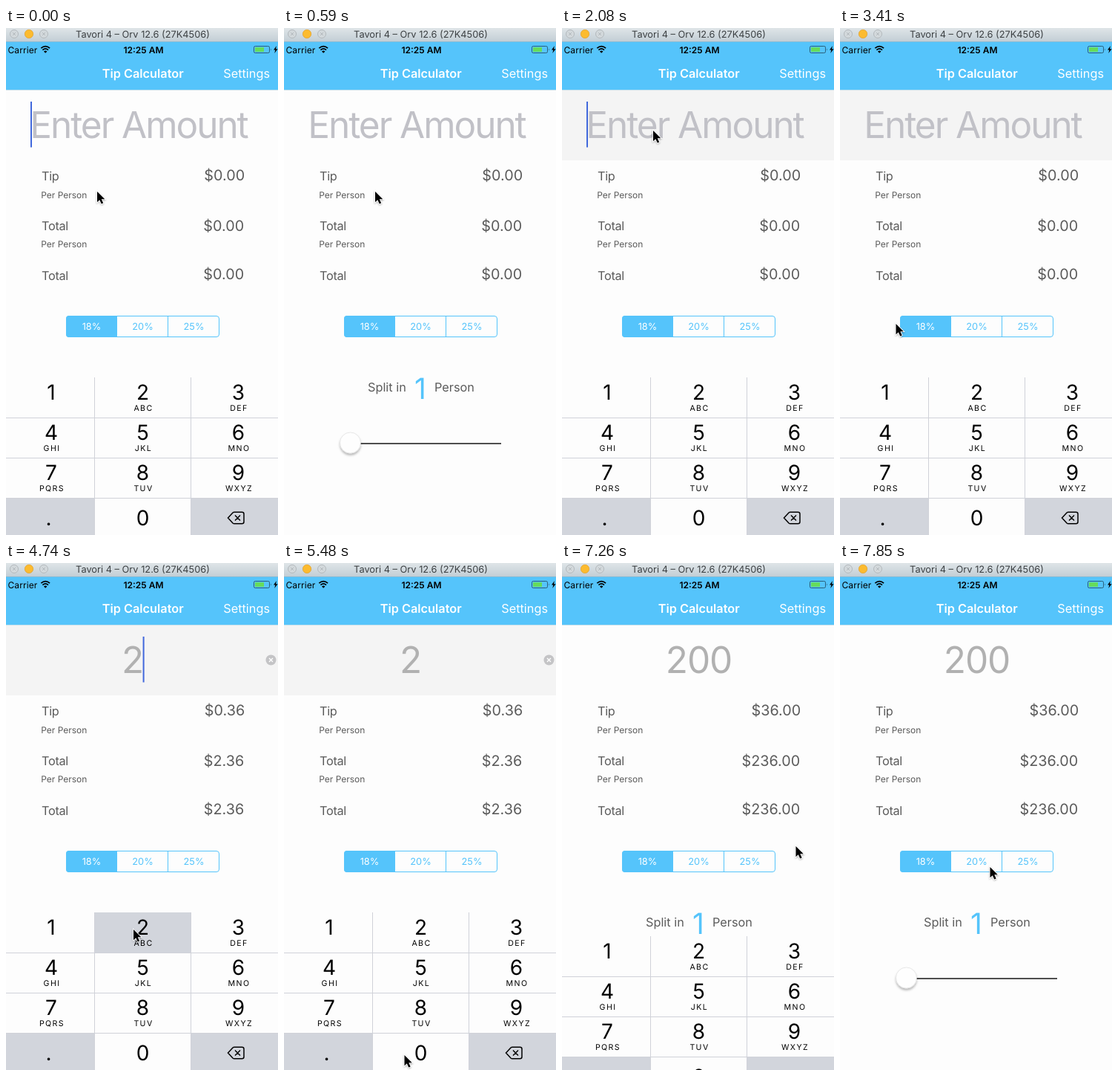
An HTML page for the animation above (8 s loop, 367 px wide and 682 px high).

```html
<!DOCTYPE html>
<html lang="en">
<head>
<meta charset="utf-8">
<title>Tip Calculator</title>
<style>
  html, body { margin: 0; width: 100%; height: 100%; overflow: hidden; background: #fdfdfd; }
  svg { display: block; width: 100vw; height: 100vh; font-family: Inter, Roboto, sans-serif; text-rendering: geometricPrecision; }
  .mid { text-anchor: middle; }
  .end { text-anchor: end; }
  .bold { font-weight: 600; }
  .gray { fill: #5b5b5b; }
  .blue { fill: #55c4fb; }
  .white { fill: #fff; }
  .t12 { font-size: 12px; }
  .t13 { font-size: 12.8px; }
  .t16 { font-size: 16.3px; }
  .money { font-size: 19.8px; }
  .amount { font-size: 49.5px; }
  .digit { font-size: 28px; }
  .letters { font-size: 10.6px; letter-spacing: 1.4px; }
</style>
</head>
<body>
<svg viewBox="0 0 367 682" preserveAspectRatio="none">
  <defs>
    <linearGradient id="bar" x2="0" y2="1">
      <stop offset="0" stop-color="#dfe5e8"/>
      <stop offset="1" stop-color="#c3ced5"/>
    </linearGradient>
    <filter id="shadow" x="-30%" y="-30%" width="160%" height="170%">
      <feDropShadow dx="0" dy="2.5" stdDeviation="1.8" flood-opacity=".28"/>
    </filter>
    <filter id="soft" x="-30%" y="-30%" width="160%" height="170%">
      <feDropShadow dx="0" dy="1" stdDeviation=".8" flood-opacity=".35"/>
    </filter>
  </defs>
  <rect width="367" height="682" fill="#fdfdfd"/>

  <!-- window bar -->
  <rect width="367" height="18" fill="url(#bar)"/>
  <g fill="#d3d9dc" stroke="#b3b9bd">
    <circle cx="11" cy="8" r="5.5"/>
    <circle cx="51" cy="8" r="5.5"/>
    <path d="M9 6l4 4m0-4l-4 4M49 6l4 4m0-4l-4 4" fill="none"/>
  </g>
  <circle cx="31" cy="8" r="5.7" fill="#fcbb2f" stroke="#e0a02c" stroke-width=".7"/>
  <text class="mid t13" x="184.5" y="13" fill="#3c4043">Tavori 4 – Orv 12.6 (27K4506)</text>

  <!-- header -->
  <rect y="18" width="367" height="65" class="blue"/>
  <rect y="18" width="367" height="1" fill="#8cbcd4"/>
  <rect y="83" width="367" height="1" fill="#c3dfec"/>
  <text class="t12" x="2.5" y="33.5" letter-spacing=".1">Carrier</text>
  <g fill="none" stroke="#000" stroke-width="1.7">
    <path d="M47.3 27.2q5.9-5.2 11.8 0M49.4 29.6q3.8-3.3 7.6 0"/>
    <path d="M51 31.4q2.2-1.8 4.4 0L53.2 33.8z" fill="#000" stroke="none"/>
  </g>
  <text class="mid bold t12" x="185.5" y="33.5">12:25 AM</text>
  <rect x="334.5" y="24.5" width="21" height="9" rx="1.8" fill="none" stroke="#2b5f78"/>
  <rect x="336" y="26" width="12" height="6" fill="#66dc5c"/>
  <path d="M357 27.5q1.5 1.5 0 3z" fill="#2b5f78"/>
  <path d="M365 24l-4 5.6h2.4l-1.2 4.4 4.4-5.8h-2.5z"/>
  <text class="mid bold t16 white" x="184.7" y="67">Tip Calculator</text>
  <text class="end t16 white" x="356" y="67">Settings</text>

  <!-- amount field -->
  <rect id="field" y="84" width="367" height="94" fill="#f4f4f4"/>
  <text id="hint" class="amount" x="32.3" y="148" letter-spacing="-2.05" fill="#c1c1c7">Enter Amount</text>
  <text id="amount" class="amount mid" y="148" letter-spacing="-1.1" fill="#b1b1b1"></text>
  <rect id="caret" y="99" width="2" height="61.5" fill="#4168dc"/>
  <g id="clear">
    <circle cx="357.5" cy="130.5" r="7" fill="#c4c4c6"/>
    <path d="M355 128l5 5m0-5l-5 5" stroke="#fff" stroke-width="1.3"/>
  </g>

  <!-- results -->
  <g class="gray">
    <g class="t16" letter-spacing="-.3">
      <text x="48" y="205">Tip</text>
      <text x="48" y="271.5">Total</text>
      <text x="48" y="338.5">Total</text>
    </g>
    <text class="t12" x="47.2" y="228.5">Per Person</text>
    <text class="t12" x="47.2" y="294.5">Per Person</text>
    <text id="tip" class="money end" x="322.2" y="205.3"></text>
    <text id="each" class="money end" x="321.2" y="273.2"></text>
    <text id="total" class="money end" x="321.2" y="337.7"></text>
  </g>

  <!-- tip rate -->
  <path class="blue" d="M150 387H85q-4 0-4 4v21q0 4 4 4h65z"/>
  <rect x="81.5" y="387.5" width="206" height="28" rx="3.5" fill="none" stroke="#55c4fb"/>
  <path d="M218.5 387v29" stroke="#55c4fb"/>
  <g class="mid t13 blue">
    <text class="white" x="115.5" y="406">18%</text>
    <text x="184.5" y="406">20%</text>
    <text x="253.5" y="406">25%</text>
  </g>

  <!-- split slider -->
  <g class="t16 gray">
    <text x="113" y="488.5">Split in</text>
    <text x="203" y="488.5">Person</text>
  </g>
  <text class="mid blue" x="184" y="499" font-size="39">1</text>
  <path d="M76 559H293" stroke="#4e4e4e" stroke-width="2"/>
  <circle cx="89.5" cy="558" r="14" fill="#fefefe" stroke="#d9d9d9" stroke-width=".6" filter="url(#shadow)"/>

  <g id="keyboard"></g>
  <path id="mouse" d="M1 1v14.200l3.300-3 2.400 5.300 2.500-1.100-2.400-5.200h4.500z" stroke="#fff" stroke-width="1.600" paint-order="stroke" filter="url(#soft)"/>
</svg>
<script>
const $ = id => document.getElementById(id);
const LOOP = 8000, STEPS = 54;

// The screen refreshes in steps; all times below count steps.
const BLINK = 6.75;            // one second
const CLOSED_AT = 0, OPENED_AT = 10, DONE_AT = 48;
const SLIDE = 4.1, HOLD = 2;
const TOP = 470, HEIGHT = 216;
const AMOUNT = "200", PRESSES = [31, 39, 41];
const SHADE = "#d2d5dc", PLAIN = "#fdfdfd";

// Pointer moves: start, end, then the place it goes to
const HOME = [122, 219];
const MOVES = [
  [5, 7, 122, 137],
  [20, 23, 74.5, 397],
  [23, 28, 171, 492],
  [33, 37, 161.5, 661],
  [42, 46, 314.5, 380],
  [49, 53, 201.5, 408],
];

const progress = (step, start, length) => Math.min(1, Math.max(0, (step - start) / length));
const easeInOut = p => p * p * (3 - 2 * p);
const easeOut = p => 1 - (1 - p) ** 3;
const money = value => "$" + value.toFixed(2);

function buildKeyboard() {
  const centers = [61, 184.5, 313.5], pitch = 54;
  const labels = ["1", "2 ABC", "3 DEF", "4 GHI", "5 JKL", "6 MNO", "7 PQRS", "8 TUV", "9 WXYZ", ".", "0", ""];
  const edges = [0, 120, 250, 368];
  const keys = labels.map((label, i) => {
    const col = i % 3, y = Math.floor(i / 3) * pitch;
    const [digit, letters = ""] = label.split(" ");
    const gap = y ? 1 : 0, lift = letters || digit === "1" ? 30 : 37;
    return `<rect id="key${digit}" x="${edges[col]}" y="${y + gap}" width="${edges[col + 1] - edges[col] - 1}"
        height="${pitch - gap}" fill="${digit > "." ? PLAIN : SHADE}"/>
      <text class="mid digit" x="${centers[col] - (digit === "." ? 3.5 : 0)}" y="${y + lift}">${digit}</text>
      <text class="mid letters" x="${centers[col] + 1}" y="${y + 45}">${letters}</text>`;
  });
  const erase = `<path d="M299.5 189l6.5-7q.8-.8 2-.8h10.5q2.5 0 2.5 2.5v10.6q0 2.5-2.5 2.5H308q-1.2 0-2-.8z
    M309 185.5l7 7m0-7l-7 7" fill="none" stroke="#000" stroke-width="1.5"/>`;
  $("keyboard").innerHTML = `<rect width="367" height="${HEIGHT}" fill="#d0d2d9"/>` + keys.join("") + erase;
}

function pointer(step) {
  return MOVES.reduce(([x, y], [start, end, toX, toY]) => {
    const p = easeInOut(progress(step, start, end - start));
    return [x + (toX - x) * p, y + (toY - y) * p];
  }, HOME);
}

function keyboardTop(step) {
  const hidden = step < OPENED_AT ? easeInOut(progress(step, CLOSED_AT, SLIDE))
    : step < DONE_AT ? 1 - easeOut(progress(step, OPENED_AT, SLIDE))
    : easeInOut(progress(step, DONE_AT, SLIDE));
  return TOP + HEIGHT * hidden;
}

function draw(step) {
  const count = PRESSES.filter(press => press <= step).length;
  const text = AMOUNT.slice(0, count), bill = Number(text);
  const lastPress = PRESSES[count - 1] ?? OPENED_AT + 1;
  const pressed = count && step - lastPress < HOLD ? AMOUNT[count - 1] : "";
  const focused = step <= CLOSED_AT || (step > OPENED_AT && step < DONE_AT);
  const blinkOn = step <= CLOSED_AT || (step - lastPress) % BLINK < 3.2;
  const show = (id, visible) => $(id).style.opacity = visible ? 1 : 0;

  show("hint", !text);
  show("caret", focused && blinkOn);
  show("clear", focused && text);
  show("field", step > OPENED_AT + 1 && step < DONE_AT);
  $("amount").textContent = text;
  $("amount").setAttribute("x", focused ? 170.5 : 184.5);
  $("caret").setAttribute("x", text ? 169.3 + 15.3 * count : 33);
  $("tip").textContent = money(bill * .18);
  $("each").textContent = $("total").textContent = money(bill * 1.18);
  for (const digit of new Set(AMOUNT)) $("key" + digit).setAttribute("fill", pressed === digit ? SHADE : PLAIN);
  $("keyboard").setAttribute("transform", `translate(0 ${Math.round(keyboardTop(step))})`);
  $("mouse").setAttribute("transform", `translate(${pointer(step)})`);
}

buildKeyboard();
const start = performance.now();
let shown = -1;
function tick() {
  const time = (performance.now() - start) % LOOP;
  const step = Math.min(STEPS - 1, Math.floor((time + 9) * STEPS / LOOP));
  if (step !== shown) draw(shown = step);
  requestAnimationFrame(tick);
}
tick();
</script>
</body>
</html>
```
